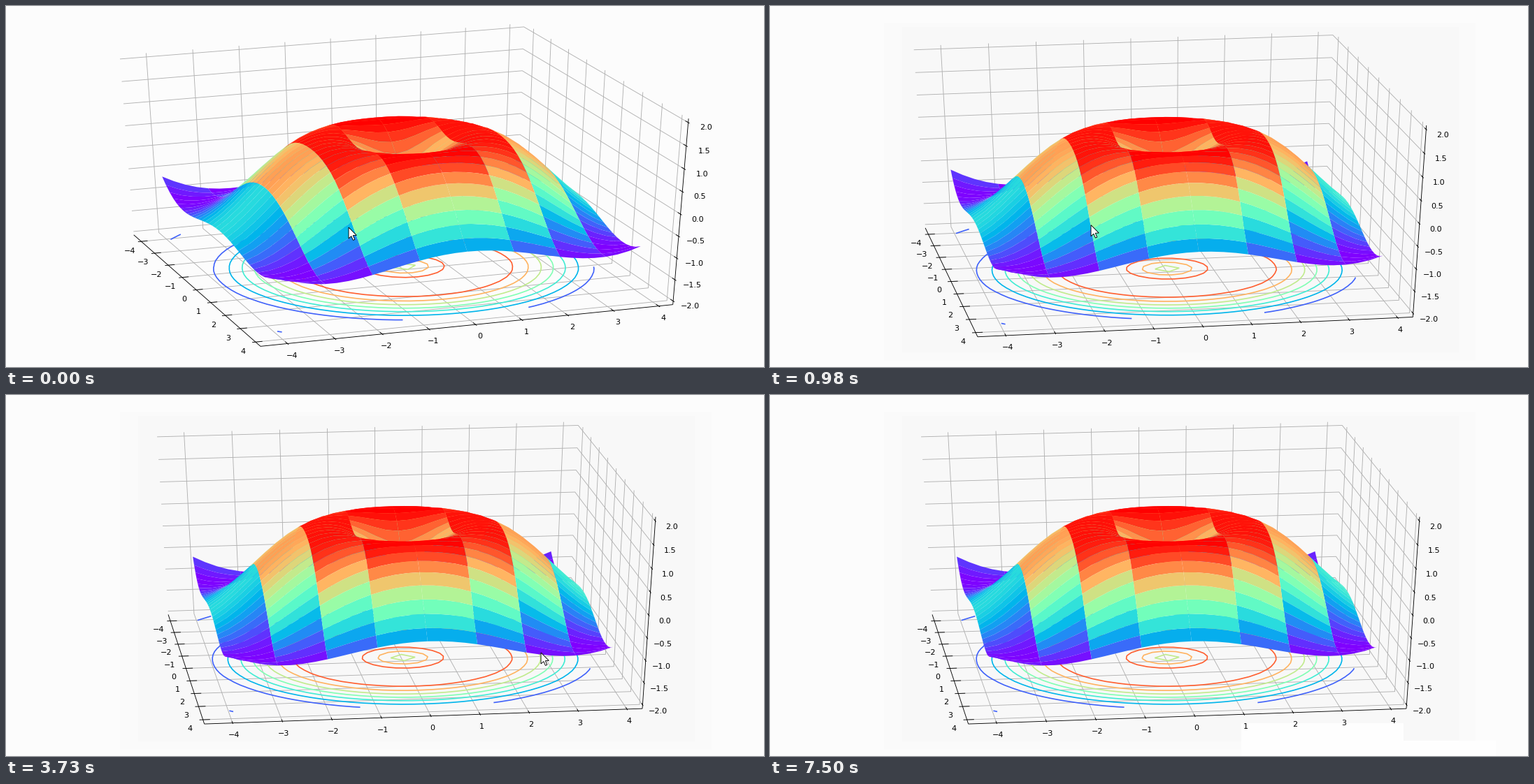
These frames come from a looping animation (1084 by 517 pixels, 8000 ms). A matplotlib script:

```python
import numpy as np
import matplotlib.pyplot as plt
from matplotlib.animation import FuncAnimation
from matplotlib.collections import LineCollection, PolyCollection
from matplotlib.patches import Polygon, Rectangle

W, H, DPI = 1084, 517, 80
LOOP, INTERVAL = 8000, 40

# Data box: centre, size, and half extent of the padded unit cube
MID = np.array([-0.125, -0.125, 0.0])
SIZE = np.array([8.525, 8.525, 4.0])
E = 25 / 48
LABEL = E + 0.0311
TICK_IN, TICK_OUT = E - 0.2 / 12, E + 0.1 / 12

# View centre and scale in pixels, eye distance in cube units
CX, CY, SX, SY, DIST = 558, 249, 594.7, 293, 10

plt.rcParams["font.family"] = "DejaVu Sans"
fig = plt.figure(figsize=(W / DPI, H / DPI), dpi=DPI, facecolor="#fcfcfc")
ax = fig.add_axes([0, 0, 1, 1])
cmap = plt.get_cmap("rainbow")


def cube(pts):
    return (np.asarray(pts, float) - MID) / SIZE


def project(pts, azim, elev):
    """Return pixel positions and depths of cube points."""
    a, e = np.radians([azim, elev])
    x, y, z = np.moveaxis(np.asarray(pts, float), -1, 0)
    right = y * np.cos(a) - x * np.sin(a)
    near = x * np.cos(a) + y * np.sin(a)
    up = z * np.cos(e) - near * np.sin(e)
    depth = DIST - near * np.cos(e) - z * np.sin(e)
    px = np.stack([CX + SX * right * DIST / depth,
                   CY - SY * up * DIST / depth], axis=-1)
    return px, depth


# Surface patches: one cell along x, four cells along y
axis = np.arange(-4, 4, 0.25)
X, Y = np.meshgrid(axis, axis)
Z = np.sin(np.hypot(X, Y))
P = np.stack([X, Y, Z], axis=-1)


def perimeter(a):
    return np.concatenate([a[0, :-1], a[:-1, -1], a[-1, :0:-1], a[:0:-1, 0]])


rows = list(range(0, len(axis) - 1, 4)) + [len(axis) - 1]
patches = [perimeter(P[r0:r1 + 1, c:c + 2])
           for r0, r1 in zip(rows, rows[1:]) for c in range(len(axis) - 1)]
mean_z = np.array([p[:, 2].mean() for p in patches])
patch_colors = cmap((mean_z - mean_z.min()) / np.ptp(mean_z))
patches = [cube(p) for p in patches]

# Contours on the floor
levels = np.arange(-0.75, 1, 0.25)
contours = ax.contour(X, Y, Z, levels=levels)
rings, ring_colors = [], []
for level, segs in zip(levels, contours.allsegs):
    for seg in segs:
        rings.append(cube(np.column_stack([seg, np.full(len(seg), -2.0)])))
        ring_colors.append(cmap((level + 1) / 2))
contours.remove()

ax.set(xlim=(0, W), ylim=(H, 0))
ax.axis("off")

# Grid, axes, ticks and labels
grid = []
frame = [[(-E, -E, -E), (E, -E, -E)],
         [(E, -E, -E), (E, E, -E)],
         [(E, E, -E), (E, E, E)]]
label_pos, label_text = [], []


def add_label(pos, text):
    label_pos.append(pos)
    label_text.append(text.replace("-", "\u2212"))


for v in range(-4, 5):
    h = (v - MID[0]) / SIZE[0]
    grid += [[(h, -E, -E), (h, E, -E), (h, E, E)],
             [(E, h, -E), (-E, h, -E), (-E, h, E)]]
    frame += [[(h, -TICK_IN, -E), (h, -TICK_OUT, -E)],
              [(TICK_IN, h, -E), (TICK_OUT, h, -E)]]
    add_label((h, -LABEL, -LABEL), str(v))
    add_label((LABEL, h, -LABEL), str(v))
    z = v / 8
    grid.append([(-E, -E, z), (-E, E, z), (E, E, z)])
    frame.append([(TICK_IN, E, z), (TICK_OUT, E, z)])
    add_label((LABEL, LABEL, z), f"{v / 2:.1f}")


def shade(x, y, w, h, color):
    return ax.add_patch(Rectangle((x, y), w, h, fc=color, ec="none", zorder=0))


# Background tones with the time each one appears
shades = [(150, shade(163, 24, 846, 484, "#fafafa")),
          (150, shade(189, 30, 796, 466, "#f8f8f8")),
          (6970, shade(674, 470, 232, 47, "#fefefe")),
          (7110, shade(880, 495, 158, 22, "#fefefe"))]

grid_lines = LineCollection([], colors="#b0b0b0", linewidths=0.8, zorder=1)
frame_lines = LineCollection([], colors="black", linewidths=0.8, zorder=2)
ring_lines = LineCollection([], colors=ring_colors, linewidths=1.5, zorder=3)
surface = PolyCollection([], edgecolors="none", zorder=4)
for coll in (grid_lines, frame_lines, ring_lines, surface):
    ax.add_collection(coll, autolim=False)
labels = [ax.text(0, 0, s, fontsize=10, ha="center", va="center", zorder=2)
          for s in label_text]

ARROW = np.array([(0, 0), (0, 16), (3.8, 12.6), (6.4, 18.4), (8.8, 17.4),
                  (6.3, 11.6), (11.3, 11.4)])
cursor = ax.add_patch(Polygon(ARROW, fc="white", ec="black", lw=0.8, zorder=6))

STEPS = np.concatenate([[0]] + [np.linspace(*s) for s in (
    (150, 1120, 8), (1240, 2210, 8), (2330, 3300, 8), (3580, 4610, 8),
    (4860, 5850, 8), (6000, 6970, 8), (7110, 7500, 4))])

# time, azimuth, elevation
VIEW = np.array([(0, -19.55, 31), (704, -10.92, 28.7), (1120, -8.9, 29),
                 (1378, -8.53, 29), (1655, -7.4, 29)])
# time, x, y
MOUSE = np.array([
    (0, 490, 317), (704, 463, 313), (1120, 457, 314), (1378, 456, 314),
    (1655, 452, 315), (1794, 404, 347), (2210, 322, 362), (2470, 320, 358),
    (3300, 526, 344), (3580, 640, 356), (3727, 765, 369), (4020, 832, 362),
    (4610, 782, 346), (5850, 579, 328), (6000, 556, 333), (6139, 428, 328),
    (6277, 316, 332), (6555, 480, 390), (6831, 690, 475), (6970, 886, 504),
    (7370, 1014, 504)])


def track(keys, t):
    return [np.interp(t, keys[:, 0], col) for col in keys[:, 1:].T]


def update(i):
    now = i * INTERVAL + 36
    t = STEPS[STEPS <= now][-1]
    view = track(VIEW, t)

    def flat(lines):
        return [project(line, *view)[0] for line in lines]

    grid_lines.set_segments(flat(grid))
    frame_lines.set_segments(flat(frame))
    ring_lines.set_segments(flat(rings))

    shapes = [project(p, *view) for p in patches]
    order = np.argsort([-depth.mean() for _, depth in shapes])
    surface.set_verts([shapes[k][0] for k in order])
    surface.set_facecolor(patch_colors[order])

    for text, (x, y) in zip(labels, project(label_pos, *view)[0]):
        text.set_position((x, y + 4.5))
    for start, rect in shades:
        rect.set_visible(t >= start)
    cursor.set_xy(ARROW + track(MOUSE, t))
    cursor.set_visible(t < 7500)
    return []


anim = FuncAnimation(fig, update, frames=LOOP // INTERVAL, interval=INTERVAL,
                     repeat=True, repeat_delay=0)
plt.show()
```
